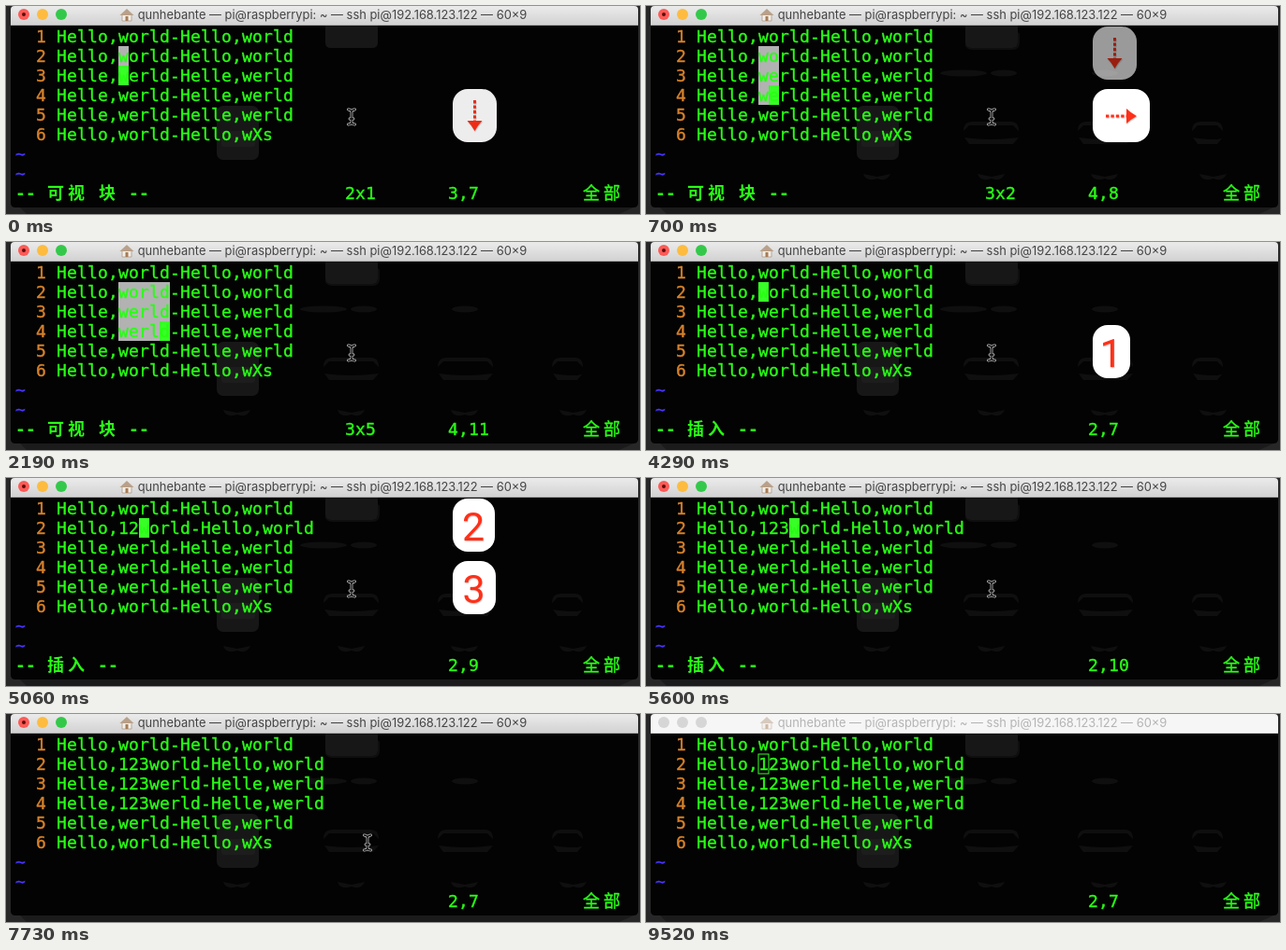
Write an HTML page that moves like this. It is 677 by 223 pixels and loops after 9680 ms.

```html
<!DOCTYPE html>
<html lang="zh-CN">
<head>
<meta charset="utf-8">
<style>
  html, body { margin: 0; width: 100%; height: 100%; overflow: hidden; background: #272727; }
  svg { display: block; }
  .cell { font: 18px 'DejaVu Sans Mono', 'Noto Sans CJK SC', monospace; fill: #28fe14; stroke: #28fe14; stroke-width: .4; white-space: pre; }
  .number { fill: #d8822a; stroke: #d8822a; }
  .tilde { fill: #4a35ff; stroke: #4a35ff; }
  .bold { font-weight: bold; stroke: none; }
  .title { font: 12.9px Inter, sans-serif; text-anchor: middle; }
  .label { font: 43px Roboto, sans-serif; text-anchor: middle; }
</style>
</head>
<body>
<svg id="stage" width="677" height="223" viewBox="0 0 677 223">
  <defs>
    <linearGradient id="bar" x2="0" y2="1">
      <stop offset="0" stop-color="#ebebeb"/><stop offset="1" stop-color="#d1d1d1"/>
    </linearGradient>
    <filter id="soft" x="-20%" y="-20%" width="140%" height="150%" color-interpolation-filters="sRGB">
      <feDropShadow dx="0.5" dy="1.2" stdDeviation="0.7" flood-color="#777" flood-opacity=".4"/>
    </filter>
  </defs>
  <path d="M15 216L22 223H655L670 216Z" fill="#1b1b1b"/>
  <path d="M5 20H675V211Q675 216 670 216H10Q5 216 5 211Z" fill="#030303"/>
  <g fill="#171717">
    <path d="M341 21H397V39Q397 45 391 45H347Q341 45 341 39Z"/>
    <rect x="225" y="107" width="45" height="58" rx="7"/>
    <rect x="230" y="134" width="36" height="17" rx="3" fill="#1d1d1d"/>
  </g>
  <g id="ghosts" fill="#0f0f0f"></g>
  <g id="bars"></g>
  <g id="selection" fill="#b2b2b2"></g>
  <rect id="cursor" height="21" width="11"/>
  <g id="text"></g>
  <g id="keys"></g>
  <g id="pointer" fill="none" stroke-linecap="round">
    <path id="beam" d="M-3.5-8Q0-8 0-5V5Q0 8-3.5 8M3.5-8Q0-8 0-5V5Q0 8 3.5 8M-2 2H2" stroke="#ccc" stroke-width="2.8"/>
    <path d="M-3.5-8Q0-8 0-5V5Q0 8-3.5 8M3.5-8Q0-8 0-5V5Q0 8 3.5 8M-2 2H2" stroke="#050505" stroke-width="1.3"/>
  </g>
</svg>
<script>
const LOOP = 9680, CELL = 11, LINE = 21, LEFT = 10, TOP = 22, TEXT_COL = 4;
const $ = id => document.getElementById(id);
const colX = col => LEFT + col * CELL;
const rowY = row => TOP + (row - 1) * LINE;

function add(parent, tag, attrs = {}, content = '') {
  const el = document.createElementNS('http://www.w3.org/2000/svg', tag);
  for (const name in attrs) el.setAttribute(name, attrs[name]);
  el.textContent = content;
  return parent.appendChild(el);
}

// One x per character; Chinese characters take two cells.
function write(row, col, string, style = '') {
  const xs = [...string].map(char => {
    const wide = char > '\u2fff';
    const x = colX(col) + (wide ? 1 : 0);
    col += wide ? 2 : 1;
    return x;
  });
  add($('text'), 'text', { x: xs.join(' '), y: rowY(row) + 17, class: 'cell ' + style }, string);
}

// time, mode, row, column, text typed in row 2, text repeated in rows 3 and 4
const SCREENS = [
  [0, '可视 块', 3, 7, '', ''],
  [400, '可视 块', 4, 7, '', ''],
  [700, '可视 块', 4, 8, '', ''],
  [940, '可视 块', 4, 9, '', ''],
  [1240, '可视 块', 4, 10, '', ''],
  [1650, '可视 块', 4, 11, '', ''],
  [3510, '插入', 2, 7, '', ''],
  [4350, '插入', 2, 8, '1', ''],
  [4710, '插入', 2, 9, '12', ''],
  [5120, '插入', 2, 10, '123', ''],
  [6200, '', 2, 7, '123', ''],
  [6260, '', 2, 7, '123', '123']
];
const BLINKS = [[3150, 3510], [7730, 8270], [8750, 9220]];
const UNFOCUS = 9520;

// label, then steps of [time, raised, opacity]
const KEYS = [
  ['↓', [0, 0, .93], [60, 0, .5], [120, 0, 0]],
  ['↓', [300, 0, 1], [640, 1, 1], [700, 1, .6], [760, 1, .25], [820, 1, 0]],
  ['→', [640, 0, 1], [880, 0, 0]],
  ['→→', [880, 0, 1], [1180, 0, 0]],
  ['→→→', [1180, 0, 1], [1590, 1, 1], [1650, 1, .5], [1710, 1, 0]],
  ['→', [1590, 0, 1], [2070, 0, .8], [2130, 0, .4], [2190, 0, 0]],
  ['I', [3450, 0, 1], [3930, 0, .5], [3990, 0, 0]],
  ['1', [4290, 0, 1], [4650, 1, 1], [4710, 1, .6], [4770, 1, .25], [4820, 1, 0]],
  ['2', [4650, 0, 1], [5060, 1, 1], [5120, 1, .5], [5180, 1, 0]],
  ['3', [5060, 0, 1], [5540, 0, .5], [5600, 0, 0]],
  ['⎋', [6140, 0, 1], [6560, 0, .78], [6610, 0, .4], [6670, 0, 0]]
];
const WIDTHS = { '↓': 47, '→': 61, '→→': 100, '→→→': 139, I: 31, 1: 40, 2: 45, 3: 46, '⎋': 61 };
const RED = '#ff3018';

function arrow(parent, transform) {
  const g = add(parent, 'g', { transform });
  add(g, 'path', { d: 'M0 0H22', stroke: RED, 'stroke-width': 3, 'stroke-dasharray': '3.4 2' });
  add(g, 'path', { d: 'M22-8Q26-4 33 0Q26 4 22 8Z', fill: RED });
}

function makeKey([label, ...steps]) {
  const width = WIDTHS[label];
  const el = add($('keys'), 'g');
  add(el, 'rect', { width, height: 57, rx: 16, fill: '#fff' });
  const icon = add(el, 'g', { filter: 'url(#soft)' });
  if (label === '↓') arrow(icon, 'translate(23.5 12) rotate(90)');
  else if (label[0] === '→') [...label].forEach((_, i) => arrow(icon, `translate(${14 + 39 * i} 29)`));
  else if (label === '⎋') {
    const color = '#ff4332';
    add(icon, 'path', { d: 'M29 15.5A13.5 13.5 0 1 1 16.8 28M32 31L20 19', fill: 'none', stroke: color, 'stroke-width': 3.2 });
    add(icon, 'path', { d: 'M14.5 14H24L14.5 23.5Z', fill: color });
  } else add(icon, 'text', { x: width / 2 - .5, y: 45, class: 'label', fill: RED }, label);
  return { el, steps };
}

function makeBar(focused) {
  const g = add($('bars'), 'g');
  add(g, 'path', { d: 'M5 21V4Q5 0 9 0H671Q675 0 675 4V21Z', fill: focused ? 'url(#bar)' : '#f6f6f6' });
  add(g, 'path', { d: 'M5 20.5H675', stroke: focused ? '#aaa' : '#d0d0d0' });
  ['#fc5b57', '#fdbc40', '#34c84a'].forEach((color, i) =>
    add(g, 'circle', { cx: 19 + 20 * i, cy: 9, r: 6, fill: focused ? color : '#d6d6d6' }));
  if (focused) add(g, 'circle', { cx: 19, cy: 9, r: 2, fill: '#5c0d0b' });
  const house = add(g, 'g', { opacity: focused ? 1 : .5 });
  add(house, 'path', { d: 'M124 9H134V16H124Z', fill: '#f4eee6', stroke: '#a79a8d', 'stroke-width': .8 });
  add(house, 'path', { d: 'M121.5 10L129 3L136.5 10Z', fill: '#b9a08a' });
  add(house, 'path', { d: 'M127.5 11H130.5V16H127.5Z', fill: '#a67c55' });
  add(g, 'text', { x: 348.5, y: 14, class: 'title', fill: focused ? '#444' : '#b4b4b4' },
    'qunhebante — pi@raspberrypi: ~ — ssh pi@192.168.123.122 — 60×9');
  return g;
}

function drawGhosts() {
  const g = $('ghosts');
  add(g, 'path', { d: 'M340 40Q341 47 349 47H391Q399 47 399 39V30L397 28V39Q397 45 391 45H347Q342 45 340 40Z' });
  for (const x of [339, 461, 583]) {
    const right = Math.min(x + 59, 616);
    add(g, 'path', { d: `M${x} 134Q${x} 124 ${x + 9} 124H${right - 8}Q${right} 124 ${right} 134L${right - 6} 128H${x + 6}Z` });
    add(g, 'path', { d: `M${x + 1} 141Q${x + 28} 145 ${right} 141L${right - 6} 148H${x + 6}Z` });
  }
  for (const x of [247, 369, 490, 606])
    add(g, 'path', { d: `M${x - 15} 180L${x} 183L${x + 14} 180Q${x + 10} 189 ${x} 185Q${x - 12} 189 ${x - 15} 180Z` });
  for (const x of [339, 382, 490])
    add(g, 'ellipse', { cx: x, cy: 72, rx: x < 350 ? 25 : 14, ry: 3.5 });
}

function drawScreen([, mode, row, col, typed, repeated]) {
  $('text').replaceChildren();
  $('selection').replaceChildren();
  const first = 'Hello,', second = 'Helle,';
  const lines = [
    'Hello,world-Hello,world',
    first + typed + 'world-Hello,world',
    second + repeated + 'werld-Helle,werld',
    second + repeated + 'werld-Helle,werld',
    'Helle,werld-Helle,werld',
    'Hello,world-Hello,wXs'
  ];
  lines.forEach((line, i) => {
    write(i + 1, 2, String(i + 1), 'number');
    write(i + 1, TEXT_COL, line);
  });
  write(7, 0, '~', 'tilde');
  write(8, 0, '~', 'tilde');
  if (mode) write(9, 0, `-- ${mode} --`, 'bold');
  write(9, 42, `${row},${col}`);
  write(9, 55, '全部');
  if (mode === '可视 块') {
    write(9, 32, `${row - 1}x${col - 6}`);
    add($('selection'), 'rect', {
      x: colX(10), y: rowY(2), width: (col - 6) * CELL, height: (row - 1) * LINE
    });
  }
  $('cursor').setAttribute('x', colX(TEXT_COL + col - 1));
  $('cursor').setAttribute('y', rowY(row));
}

function pointerAt(t) {
  if (t >= 8750) return [386, 140];
  const p = Math.min(1, Math.max(0, (t - 7400) / 330));
  const eased = p * p * (3 - 2 * p);
  return [369 + 17 * eased, 119 + 19 * eased];
}

const stepAt = (steps, t) => steps.findLast(step => step[0] <= t);
const keys = KEYS.map(makeKey);
const activeBar = makeBar(true), idleBar = makeBar(false);
drawGhosts();
let shown;

function render(t) {
  const screen = stepAt(SCREENS, t);
  if (screen !== shown) drawScreen(shown = screen);
  const focused = t < UNFOCUS;
  activeBar.style.display = focused ? '' : 'none';
  idleBar.style.display = focused ? 'none' : '';
  $('ghosts').style.display = t < 60 ? 'none' : '';

  const cursor = $('cursor');
  cursor.style.display = BLINKS.some(([off, on]) => t >= off && t < on) ? 'none' : '';
  cursor.setAttribute('fill', focused ? '#38fe27' : 'none');
  cursor.setAttribute('stroke', focused ? 'none' : '#38fe27');

  for (const { el, steps } of keys) {
    const [, raised, opacity] = stepAt(steps, t) || [0, 0, 0];
    el.setAttribute('transform', `translate(477 ${raised ? 22 : 89})`);
    el.setAttribute('opacity', opacity);
  }
  $('pointer').setAttribute('transform', `translate(${pointerAt(t)})`);
  $('pointer').style.display = focused ? '' : 'none';
}

const start = performance.now();
function tick() {
  render((performance.now() - start) % LOOP);
  requestAnimationFrame(tick);
}
render(0);
requestAnimationFrame(tick);
</script>
</body>
</html>
```
